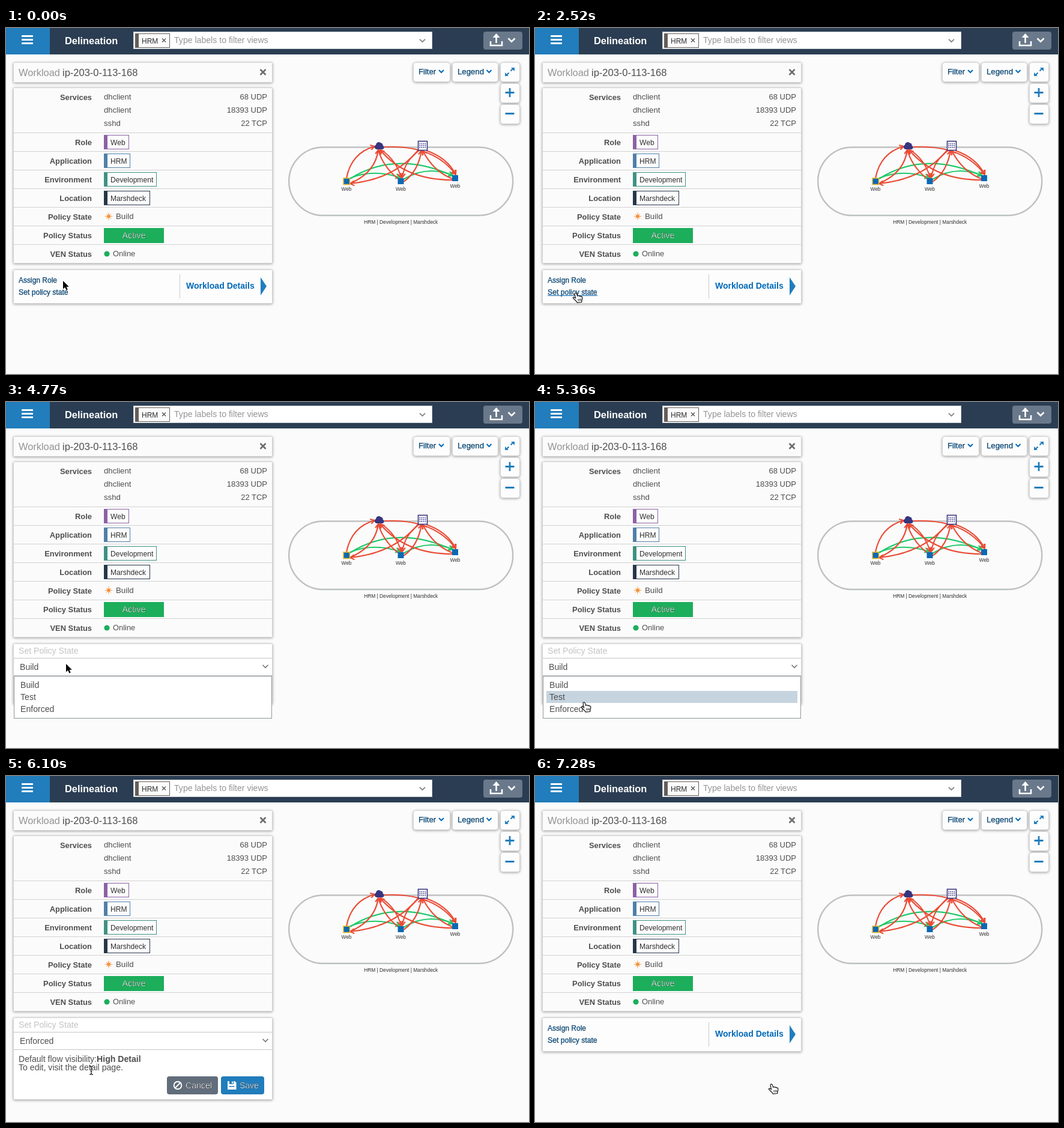
These frames come from a looping animation (871 by 576 pixels, 8 s). An HTML page:

```html
<!DOCTYPE html>
<html lang="en">
<head>
<meta charset="utf-8">
<title>Workload policy</title>
<style>
html, body { margin: 0; width: 100%; height: 100%; overflow: hidden; background: #fbfbfb; }
svg { display: block; font-family: "Liberation Sans", Arial, sans-serif; }
text { fill: #4e4e50; white-space: pre; }
.b { font-weight: bold; }
.r { text-anchor: end; }
.m { text-anchor: middle; }
.w { fill: #fff; }
.link { fill: #0069b8; }
.med { stroke: currentColor; stroke-width: .25px; }
.dim { fill: #949494; }
.faint { fill: #c3c3c3; }
.dark { fill: #2f2f31; }
.line { fill: none; stroke-linecap: butt; }
.card { stroke: #d2d2d2; filter: drop-shadow(0 1px 2px rgba(0, 0, 0, .36)); }
.sep { stroke: #d3d3d3; }
</style>
</head>
<body>
<svg id="stage" width="871" height="576" viewBox="0 0 871 576"></svg>
<script>
const stage = document.getElementById('stage');
const BLUE = '#217dbc', RED = '#ea4a34', GREEN = '#1fc968', NAVY = '#2b3d52';

const text = (x, y, size, str, cls = '') =>
  `<text x="${x}" y="${y}" font-size="${size}" class="${cls}">${str}</text>`;
const rect = (x, y, w, h, fill, extra = '') =>
  `<rect x="${x}" y="${y}" width="${w}" height="${h}" fill="${fill}" ${extra}/>`;
const line = (d, color, width = 1, extra = '') =>
  `<path class="line" d="${d}" stroke="${color}" stroke-width="${width}" ${extra}/>`;
const card = (x, y, w, h, fill = '#fbfbfb', r = 1) =>
  rect(x + .5, y + .5, w - 1, h - 1, fill, `rx="${r}" class="card"`);
const chevron = (x, y, half, color, width) =>
  line(`M${x - half} ${y - half / 2}l${half} ${half}l${half} ${-half}`, color, width);
const group = (id, body) => `<g id="${id}">${body}</g>`;

function header() {
  return rect(0, 0, 871, 44, NAVY) + rect(0, 0, 73, 44, BLUE) +
    [12, 18, 24].map(y => rect(26, y, 19, 3, '#fff', 'rx=".6"')).join('') +
    text(98, 27, 16.4, 'Delineation', 'b w') +
    rect(212.5, 6.5, 497, 28, '#fff', 'stroke="#ccd1d6"') +
    rect(215.5, 9.5, 57, 23, '#fbfbfb', 'stroke="#645d59"') + rect(215, 9, 6, 24, '#645d59') +
    text(226, 26, 12, 'HRM', 'dark') +
    line('M260 17.5l6 6m0-6l-6 6', '#555', 1.4) +
    text(280, 25, 14.1, 'Type labels to filter views', 'dim') +
    chevron(693.5, 21, 4.5, '#888', 1.8) +
    rect(795, 6, 65, 30, '#69788a', 'rx="4"') +
    line('M807 22v7h19v-7M816.500 25v-11', '#fff', 2.6) +
    '<path class="w" d="M810.5 16l6-7 6 7z"/>' +
    chevron(842, 20, 5.5, '#fff', 2.6);
}

function tag(y, w, color, str) {
  return rect(163.5, y + .5, w - 1, 23, '#fdfdfd', `stroke="${color}"`) +
    rect(163, y, 6, 24, color) + text(174, y + 17, 12.1, str, 'dark');
}

function details() {
  const labels = ['Role', 'Application', 'Environment', 'Location',
    'Policy State', 'Policy Status', 'VEN Status'];
  const services = [['dhclient', '68 UDP'], ['dhclient', '18393 UDP'], ['sshd', '22 TCP']];
  let rays = '';
  for (let a = 0; a < 8; a++) {
    rays += `<path d="M-1 0L0 ${a % 2 ? -6.5 : -7.8}L1 0z" transform="rotate(${a * 45})"/>`;
  }
  return card(12, 57, 432, 34) +
    text(21, 80, 16.4, 'Workload', 'dim') + text(94, 80, 16.5, 'ip-203-0-113-168') +
    line('M423.500 69l9 9m0-9l-9 9', '#6b6b6d', 2.5) +
    card(12, 99, 432, 293) +
    text(143, 120, 12.9, 'Services', 'b r') +
    services.map(([name, port], i) => text(163, 119 + i * 22, 13.2, name) +
      text(435, 119 + i * 22, 13, port, 'r')).join('') +
    labels.map((s, i) => rect(13, 174 + i * 31, 430, 1, '#d3d3d3') +
      text(143, 195 + i * 31, 12.9, s, 'b r')).join('') +
    tag(178, 42, '#8b62a6', 'Web') + tag(209, 44, '#4f80aa', 'HRM') +
    tag(240, 88, '#3f9282', 'Development') + tag(271, 77, '#27364a', 'Marshdeck') +
    `<g transform="translate(171 313.5)" fill="#f58a2c">${rays}</g>` +
    text(183, 318, 13.3, 'Build') +
    rect(163, 333, 100, 25, '#1cae5b') + text(213, 350, 14.3, 'Active', 'm w med') +
    '<circle cx="168" cy="376" r="4.600" fill="#1cae5b"/>' + text(178, 380, 12.9, 'Online');
}

function controls() {
  const box = (x, y, w) => card(x, y, w, 33, '#fdfdfd', 4);
  return box(678, 57, 62) + text(687, 77, 13.1, 'Filter', 'link med') + chevron(725, 72, 4, '#0069b8', 2) +
    box(743, 57, 77) + text(752, 77, 13.2, 'Legend', 'link med') + chevron(804.5, 72, 4, '#0069b8', 2) +
    box(823, 57, 33) + box(823, 92, 33) + box(823, 127, 33) +
    line('M840.500 71.500l4-4M837.500 74.500l-4 4', BLUE, 2.2) +
    `<path fill="${BLUE}" d="M841 66h6v6zM831 74v6h6z"/>` +
    line('M831.500 107.500h15M839 100v15M831.500 142.500h15', BLUE, 2.8);
}

function graph() {
  const marker = (id, color) => `<marker id="${id}" viewBox="-8 -5 10 10" refX="0" refY="0"
    markerWidth="10" markerHeight="10" markerUnits="userSpaceOnUse" orient="auto">
    <path d="M-7-4L0 0L-7 4" fill="none" stroke="${color}" stroke-width="2"/></marker>`;
  const edges = (list, color, id) =>
    list.map(d => line(d, color, 2.1, `marker-end="url(#${id})"`)).join('');
  const node = (x, y) => rect(x - 5, y - 5, 10, 10, '#0b69b3') +
    text(x, y + 16, 8.4, 'Web', 'm dark');
  let dots = '';
  for (let i = 0; i < 12; i++) dots += rect(688.500 + i % 4 * 3, 192 + (i >> 2) * 3, 1.6, 1.6, '#37357f');
  return `<defs>${marker('red', RED)}${marker('green', GREEN)}</defs>` +
    rect(471.2, 198.5, 373, 113.5, 'none', 'rx="56.7" stroke="#c0c1c1" stroke-width="2.5"') +
    line('M529 312H787', '#b7c3bd', 2.2) +
    edges(['M573 250Q612 234 656 249', 'M573 251Q649 203 744 246',
      'M662 252Q700 228 744 245'], GREEN, 'green') +
    edges(['M567 250Q575 208 614 197', 'M575 258Q615 240 620 203',
      'M625 203Q650 220 658 249', 'M653 251Q628 231 620 203',
      'M630 198Q712 194 749 244', 'M743 253Q665 253 623 203',
      'M688 204Q664 221 660 249', 'M662 256Q686 240 692 204',
      'M700 204Q735 216 749 244', 'M743 251Q711 238 694 204',
      'M686 204Q646 252 573 259'], RED, 'red') +
    '<path fill="#37357f" d="M617 202a4 4 0 0 1-1-7.500a5 5 0 0 1 8.500-3a3.500 3.500 0 0 1 3 4a3.400 3.400 0 0 1-.5 6.500z"/>' +
    rect(686.500, 188.500, 15, 15, '#fff', 'stroke="#37357f" stroke-width="1.6"') + dots +
    node(567, 255) + node(657.5, 255) + node(748, 250) +
    rect(562, 250, 10.5, 10.5, 'none', 'stroke="#e3b92e" stroke-width="1.6"') +
    text(657.7, 326, 8.4, 'HRM | Development | Marshdeck', 'm dark');
}

function linksPanel() {
  return card(12, 402, 432, 57, '#fdfdfd') +
    text(21, 424, 12, 'Assign Role', 'link med') + text(21, 444, 12.2, 'Set policy state', 'link med') +
    group('under0', rect(21, 425, 64, 1, '#0069b8')) +
    group('under1', rect(21, 445, 83, 1, '#0069b8')) +
    rect(289, 410, 1, 40, '#c9c9c9') +
    text(300, 434, 14.05, 'Workload Details', 'b link') +
    `<path fill="${BLUE}" d="M424 415l10 15-10 15z"/>`;
}

function formPanel() {
  return `<rect id="formCard" x="12.5" y="402.5" width="431" height="100" rx="1" fill="#fff" class="card"/>` +
    text(21, 419, 14.1, 'Set Policy State', 'faint') +
    rect(13, 426, 430, 1, '#c6c6c6') + rect(13, 455, 430, 1, '#c6c6c6') +
    '<text id="choice" x="23" y="446" font-size="14.1"></text>' +
    chevron(432, 440, 4.5, '#777', 1.7) +
    group('note', text(21, 476, 14.1, 'Default flow visibility:<tspan class="b">High Detail</tspan>') +
      text(21, 490, 14.1, 'To edit, visit the detail page.')) +
    group('buttons', rect(268, 464, 85, 30, '#626d7c', 'rx="4"') +
      '<circle cx="286" cy="479" r="6.300" fill="none" stroke="#fff" stroke-width="1.900"/>' +
      line('M281.500 483.500l9-9', '#fff', 1.9) + text(299, 484, 14.1, 'Cancel', 'w med') +
      rect(358, 464, 72, 30, BLUE, 'rx="4"') +
      '<path class="w" d="M369 472h12l2.500 2.500v11.500h-14.500z"/>' +
      rect(372, 472, 7, 5, BLUE) + rect(376, 472.500, 2, 3.5, '#fff') + rect(371.500, 480, 9, 1.5, BLUE) +
      text(389, 484, 13.9, 'Save', 'w med')) +
    group('list', rect(13.5, 456.5, 429, 70, '#fff', 'stroke="#8f979b"') +
      rect(19, 461, 418, 20, '#c5d4df', 'id="hover"') +
      ['Build', 'Test', 'Enforced'].map((s, i) => text(24, 476 + i * 20, 14.1, s)).join(''));
}

function cursors() {
  return group('arrow', '<path d="M0 0V13.500L3.200 10.600L5.400 15.400L7.700 14.400L5.600 9.800H9.800Z" stroke="#fff" stroke-width="1" paint-order="stroke"/>') +
    group('hand', '<path d="M-2 2C-2 0 .5-.3 1.200 1.600L2.600 5.600C3.500 4.600 5.300 4.800 5.600 6C6.600 5.200 8.200 5.600 8.400 6.800C9.600 6.200 10.800 7 10.800 8.200C11 11.500 9.600 12.500 9.600 16L2.200 16.600C1.500 14-2 12-4.500 9.200C-5.200 7.800-3.400 7-2 8.200L-.5 9.200Z" fill="#fff" stroke="#111" stroke-width="1.200"/>' +
      line('M3.800 10.500l.6 3.500M6 10.300l.5 3.500M8.200 10l.2 3.600', '#111', .9)) +
    group('beam', line('M-3-7q3 0 3 2V5q0 2-3 2M3-7q-3 0-3 2V5q0 2 3 2M-1.500 2h3', '#111', 1.1));
}

stage.innerHTML = header() + details() + controls() + graph() +
  group('links', linksPanel()) + group('form', formPanel()) + cursors();

// time, cursor, x, y, view, hovered item
const STEPS = [
  [0, 'arrow', 95, 421, 'links'],
  [150, 'arrow', 94, 422, 'links'],
  [300, 'arrow', 93, 423, 'links'],
  [450, 'arrow', 92, 424, 'links'],
  [600, 'arrow', 91, 424, 'links'],
  [750, 'arrow', 91, 425, 'links'],
  [1640, 'hand', 79, 422, 'links', 0],
  [1780, 'hand', 72, 422, 'links', 0],
  [2380, 'hand', 70, 434, 'links', 1],
  [2520, 'hand', 68, 440.5, 'links', 1],
  [4020, 'hand', 68, 440.5, 'form'],
  [4170, 'arrow', 77, 439, 'form'],
  [4320, 'arrow', 92, 436, 'form'],
  [4470, 'arrow', 100, 436, 'form'],
  [4770, 'arrow', 100, 436, 'list'],
  [4920, 'arrow', 99, 441, 'list'],
  [5070, 'hand', 94, 463, 'list', 0],
  [5210, 'hand', 87, 485, 'list', 1],
  [5360, 'hand', 82, 499.5, 'list', 1],
  [5500, 'hand', 84, 506, 'list', 2],
  [5650, 'hand', 85, 508, 'list', 2],
  [6100, 'beam', 142, 490, 'done'],
  [6250, 'arrow', 270, 462, 'done'],
  [6400, 'arrow', 430, 437, 'done'],
  [6550, 'arrow', 522, 454, 'done'],
  [6690, 'arrow', 448, 494, 'done'],
  [6830, 'hand', 405, 509, 'done'],
  [6980, 'hand', 394, 512.5, 'done'],
  [7280, 'hand', 394, 512.5, 'links']
];
const LOOP = 8000;
const el = id => document.getElementById(id);
const show = (id, on) => el(id).setAttribute('display', on ? 'inline' : 'none');
let current = null;

function apply([, cursor, x, y, view, hover]) {
  const done = view === 'done', list = view === 'list';
  show('links', view === 'links');
  show('form', view !== 'links');
  show('under0', hover === 0);
  show('under1', hover === 1);
  show('note', done);
  show('list', list);
  show('buttons', !list);
  show('hover', list && hover !== undefined);
  el('hover').setAttribute('y', 461 + (hover || 0) * 20);
  el('choice').textContent = done ? 'Enforced' : 'Build';
  el('formCard').setAttribute('height', done ? 136 : 100);
  el('buttons').setAttribute('transform', `translate(0 ${done ? 36 : 0})`);
  for (const id of ['arrow', 'hand', 'beam']) show(id, id === cursor);
  el(cursor).setAttribute('transform', `translate(${x} ${y})`);
}

const start = performance.now();
function tick() {
  const t = (performance.now() - start) % LOOP;
  const step = STEPS.findLast(s => s[0] <= t) || STEPS[0];
  if (step !== current) apply(current = step);
  requestAnimationFrame(tick);
}
tick();
</script>
</body>
</html>
```
